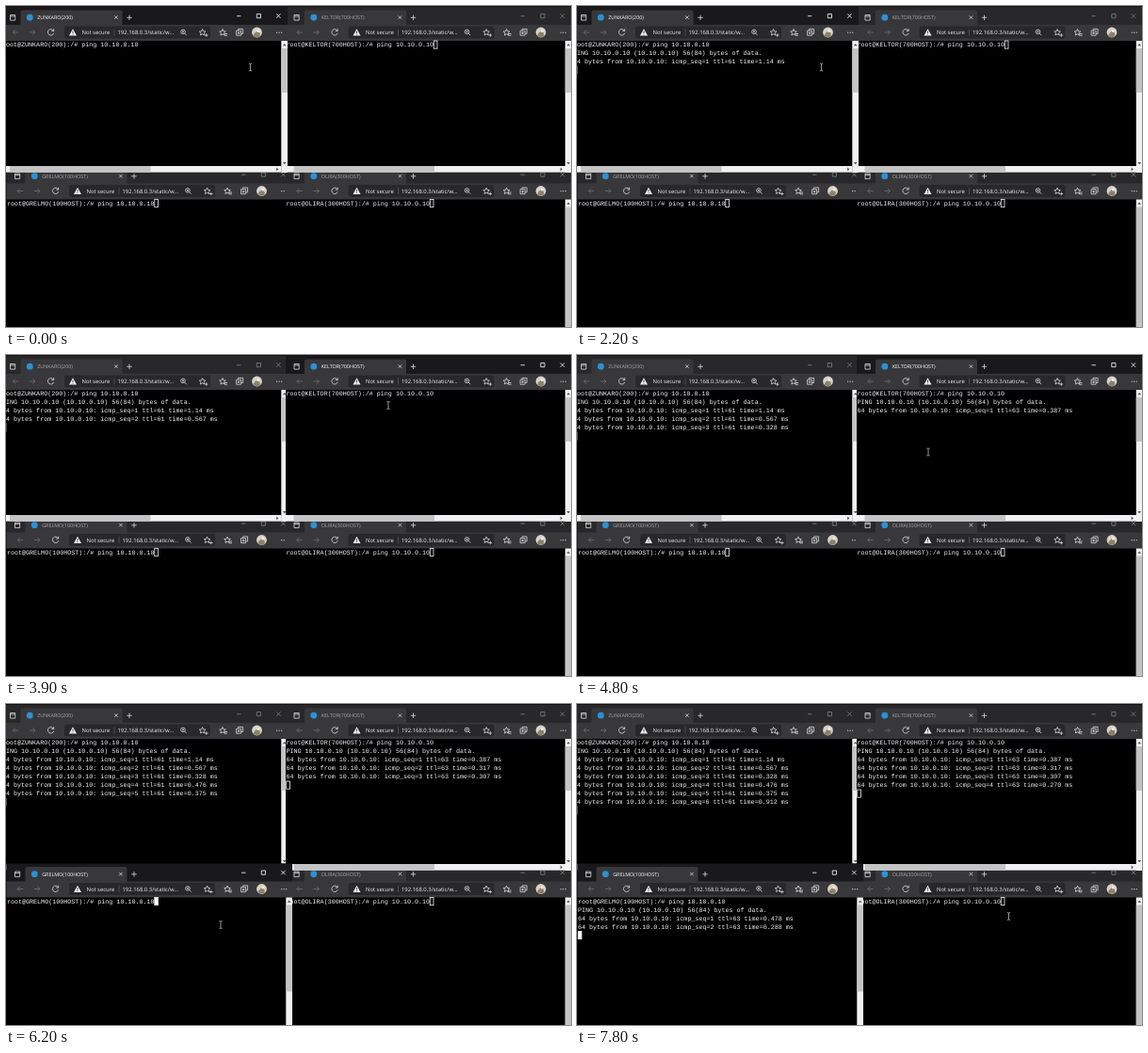
Recreate the animation shown at these times as an HTML page. Size 600 px wide and 341 px high, loop 8000 ms.

```html
<!DOCTYPE html>
<html lang="en">
<head>
<meta charset="utf-8">
<title>Four terminals</title>
<style>
html, body { margin: 0; width: 100%; height: 100%; overflow: hidden; background: #1c0e0d; }
svg { display: block; width: 600px; height: 341px; }
text { text-rendering: geometricPrecision; white-space: pre; }
.ui { font-family: "Open Sans", "Noto Sans", sans-serif; font-size: 5.9px; fill: #f0f0f0; }
.term { font-family: "Liberation Mono", monospace; font-size: 6.69px; fill: #f4f4f4; }
.bar { fill: #28282a; }
.tab, .tool { fill: #38383b; }
.name { font-size: 5.4px; fill: #a9a9ab; }
.ctl { stroke: #828284; }
.active .bar { fill: #19191b; }
.active .name { fill: #fff; }
.active .ctl { stroke: #fff; }
.line { fill: none; stroke-width: .8; }
.icon { stroke: #dcdcdc; }
.dim { stroke: #707073; }
.caret { fill: none; stroke: #f4f4f4; stroke-width: .8; }
.caret.block { fill: #fff; }
</style>
</head>
<body>
<svg id="stage" viewBox="0 0 600 341">
  <defs>
    <g id="chrome">
      <path class="line icon" d="M4.5 9.5h5.2v5.6h-5.2zM4.5 11h5.2"/>
      <circle cx="25.3" cy="12.2" r="3.4" fill="#2a92d4"/>
      <path class="line icon" d="M115.2 10.4l3.4 3.4m0-3.4l-3.4 3.4M128.3 12.3h5.4m-2.7-2.7v5.4"/>
      <g class="line dim">
        <path d="M13.3 28h-6m2.6-2.6L7.3 28l2.6 2.6M25 28h6m-2.6-2.6L31 28l-2.6 2.6"/>
      </g>
      <path class="line icon" d="M50.4 26.2a3.2 3.2 0 1 0 .3 2.6M50.7 24.2v2.4h-2.4"/>
      <rect x="62" y="21.6" width="155" height="13" rx="2.5" fill="#28282b"/>
      <path d="M71 24.2l4 7.2h-8z" fill="#f0f0f0"/>
      <path d="M71 26.6v2.4m0 .7v.9" stroke="#28282b" stroke-width=".8"/>
      <text class="ui" x="80.5" y="30.2">Not secure</text>
      <path d="M115 24.5v7" stroke="#6a6a6c" stroke-width=".6"/>
      <text class="ui" x="118.5" y="30.2">192.168.0.3/static/w...</text>
      <g class="line icon">
        <circle cx="188" cy="27.4" r="2.3"/>
        <path d="M189.7 29.1l2 2M187 27.4h2m-1-1v2"/>
        <use href="#star" x="208.6" y="28"/>
        <path d="M211 31h3.6m-1.8-1.8v3.6"/>
        <use href="#star" x="230" y="28"/>
        <path d="M232 29.5h3m-3 1.8h3"/>
        <path d="M244.6 26.2h5v5h-5zM246.6 26v-1.6h5v5h-1.8M245.8 28.7h2.6m-1.3-1.3v2.6"/>
      </g>
      <circle cx="266.5" cy="28" r="5.4" fill="#d8d3ca"/>
      <path d="M262.6 31.6c1-4 3-3.400 4-6.200c1.600 1 3.600 3 3.200 6.400a5.400 5.400 0 0 1-7.200-.2z" fill="#8f8069"/>
      <circle cx="267.800" cy="26.400" r="1.700" fill="#eee9df"/>
      <g fill="#dcdcdc">
        <circle cx="287.700" cy="28.200" r=".6"/><circle cx="290.200" cy="28.200" r=".6"/><circle cx="292.700" cy="28.200" r=".6"/>
      </g>
    </g>
    <path id="star" d="M0-3.400L1-1.100 3.300-.9 1.600.7 2.100 3 0 1.800-2.100 3-1.600.7-3.300-.9-1-1.100z"/>
  </defs>
  <g id="desk"></g>
  <path id="mouse" class="line" stroke="#c4c4c4" d="M-1.600-3.800h1.200l.4.400l.4-.4h1.200M0-3.400v6.800M-1.600 3.800h1.200l.4-.4l.4.400h1.200"/>
</svg>
<script>
const LOOP = 8000, STEP = 100;
const COL = 4.015, ROW = 9;
const HOST = "10.10.0.10";
const desk = document.getElementById("desk");
const mouse = document.getElementById("mouse");

// enter: newline; start: header line; first: first reply, then one per second
const specs = {
  tl: { x: 0, y: 0, name: "ZUNKARO(200)", focus: -1000, blur: 3300,
        enter: 2000, start: 2100, first: 2200, ttl: 61,
        ms: ["1.14", "0.567", "0.328", "0.476", "0.375", "0.912"] },
  tr: { x: 301.5, y: 0, name: "KELTOR(700HOST)", focus: 3300, blur: 6000,
        enter: 4200, start: 4200, first: 4200, ttl: 63,
        ms: ["0.387", "0.317", "0.307", "0.270"] },
  bl: { x: 5, y: 168.5, name: "GRELMO(100HOST)", focus: 6000, blur: LOOP, thumb: 92,
        enter: 6500, start: 6600, first: 6600, ttl: 63,
        ms: ["0.478", "0.288"] },
  br: { x: 301.5, y: 168.5, name: "OLIRA(300HOST)", focus: LOOP, blur: LOOP, thumb: 150,
        enter: LOOP, start: LOOP, ms: [] }
};

const rect = (x, y, w, h, attr) =>
  `<rect x="${x}" y="${y}" width="${w}" height="${h}" ${attr}/>`;

function scrollbars(thumb) {
  const track = 'fill="#f1f1f1"', grip = 'fill="#c4c4c4"';
  const up = '<path d="M293.800 42.200l1.900-2.200 1.900 2.200z" fill="#505050"/>';
  if (thumb) return rect(292.3, 37, 6.7, 310, track) + rect(292.3, 45, 6.7, thumb, grip) + up;
  return rect(292.3, 37, 6.7, 140, track) + rect(292.3, 45, 6.7, 47, grip) + up +
    rect(-4.5, 170, 297, 6.7, track) + rect(4, 170, 149.5, 6.7, grip) +
    '<path d="M287.200 171.500l2.200 1.900-2.200 1.900z" fill="#505050"/>' +
    '<path d="M293.800 166l1.900 2.200 1.900-2.200z" fill="#505050"/>';
}

function build(spec) {
  const prompt = `root@${spec.name}:/# ping ${HOST}`;
  spec.lines = [
    { at: 0, text: prompt },
    { at: spec.start, text: `PING ${HOST} (${HOST}) 56(84) bytes of data.` },
    ...spec.ms.map((ms, i) => ({
      at: spec.first + i * 1000,
      text: `64 bytes from ${HOST}: icmp_seq=${i + 1} ttl=${spec.ttl} time=${ms} ms`
    }))
  ];
  const g = document.createElementNS("http://www.w3.org/2000/svg", "g");
  g.setAttribute("transform", `translate(${spec.x} ${spec.y})`);
  const bottom = spec.thumb ? 345 : 176.7;
  g.innerHTML =
    rect(-4.5, 1, 303.5, bottom - 1, 'fill="#000"') +
    rect(-4.5, 1, 303.5, 19.500, 'class="bar"') +
    '<path class="tab" d="M15.500 20.500V6.500q0-2 2-2H121.500q2 0 2 2V20.500z"/>' +
    rect(-4.5, 20, 303.5, 17, 'class="tool"') +
    '<use href="#chrome"/>' +
    `<text class="ui name" x="33.200" y="14.200">${spec.name}</text>` +
    '<path class="line ctl" d="M245 10.700h4.400M266.300 8.500h4.200v4.200h-4.200zM287.200 8.400l4.400 4.400m0-4.400l-4.400 4.400"/>' +
    spec.lines.map((l, i) => `<text class="term" x="-4" y="${43 + i * ROW}">${l.text}</text>`).join("") +
    '<rect class="caret" width="3.700" height="8.200"/>' +
    scrollbars(spec.thumb);
  spec.g = g;
  spec.rows = [...g.querySelectorAll(".term")];
  spec.caret = g.querySelector(".caret");
  spec.promptEnd = prompt.length;
  desk.append(g);
}

function drawWindow(spec, t) {
  const active = t >= spec.focus && t < spec.blur;
  spec.g.classList.toggle("active", active);
  let shown = 0, last = spec.focus;
  spec.lines.forEach((l, i) => {
    const on = t >= l.at;
    spec.rows[i].style.display = on ? "" : "none";
    if (on) { shown++; last = Math.max(last, l.at); }
  });
  const entered = t >= spec.enter;
  if (entered) last = Math.max(last, spec.enter);
  // The first prompt is already waiting when the loop starts.
  const since = t - (entered ? last : spec.focus);
  const lit = since % 1200 < 600;
  spec.caret.setAttribute("x", -3.8 + (entered ? 0 : spec.promptEnd * COL));
  spec.caret.setAttribute("y", 37 + (entered ? shown * ROW : 0));
  spec.caret.classList.toggle("block", active);
  spec.caret.style.display = active && !lit ? "none" : "";
}

const layers = [
  [0, ["bl", "br", "tr", "tl"]],
  [3200, ["bl", "br", "tl", "tr"]],
  [5900, ["br", "tl", "tr", "bl"]]
];
let stacked = null;
function stack(t) {
  const order = layers.filter(l => t >= l[0]).pop()[1];
  if (order === stacked) return;
  stacked = order;
  order.forEach(id => desk.append(specs[id].g));
}

// time, x, y
const path = [
  [0, 259.5, 65], [2600, 259.5, 65], [3200, 409.5, 58.5], [3400, 409.5, 58.5],
  [3600, 406, 53.5], [4700, 406, 53.5], [4800, 373, 103], [5000, 373, 103],
  [5600, 228, 234.5], [7200, 228, 234.5], [7800, 458.5, 225.5], [LOOP, 458.5, 225.5]
];
function moveMouse(t) {
  const i = path.findIndex(p => p[0] > t);
  const [a, b] = [path[i - 1], path[i]];
  const u = (t - a[0]) / (b[0] - a[0]);
  const e = u * u * (3 - 2 * u);
  const at = k => a[k] + (b[k] - a[k]) * e;
  mouse.setAttribute("transform", `translate(${at(1)} ${at(2)})`);
}

function draw(now) {
  const t = Math.floor((now % LOOP) / STEP) * STEP;
  stack(t);
  for (const id in specs) drawWindow(specs[id], t);
  moveMouse(t);
  requestAnimationFrame(() => draw(performance.now() - begin));
}

Object.values(specs).forEach(build);
const begin = performance.now();
draw(0);
</script>
</body>
</html>
```
